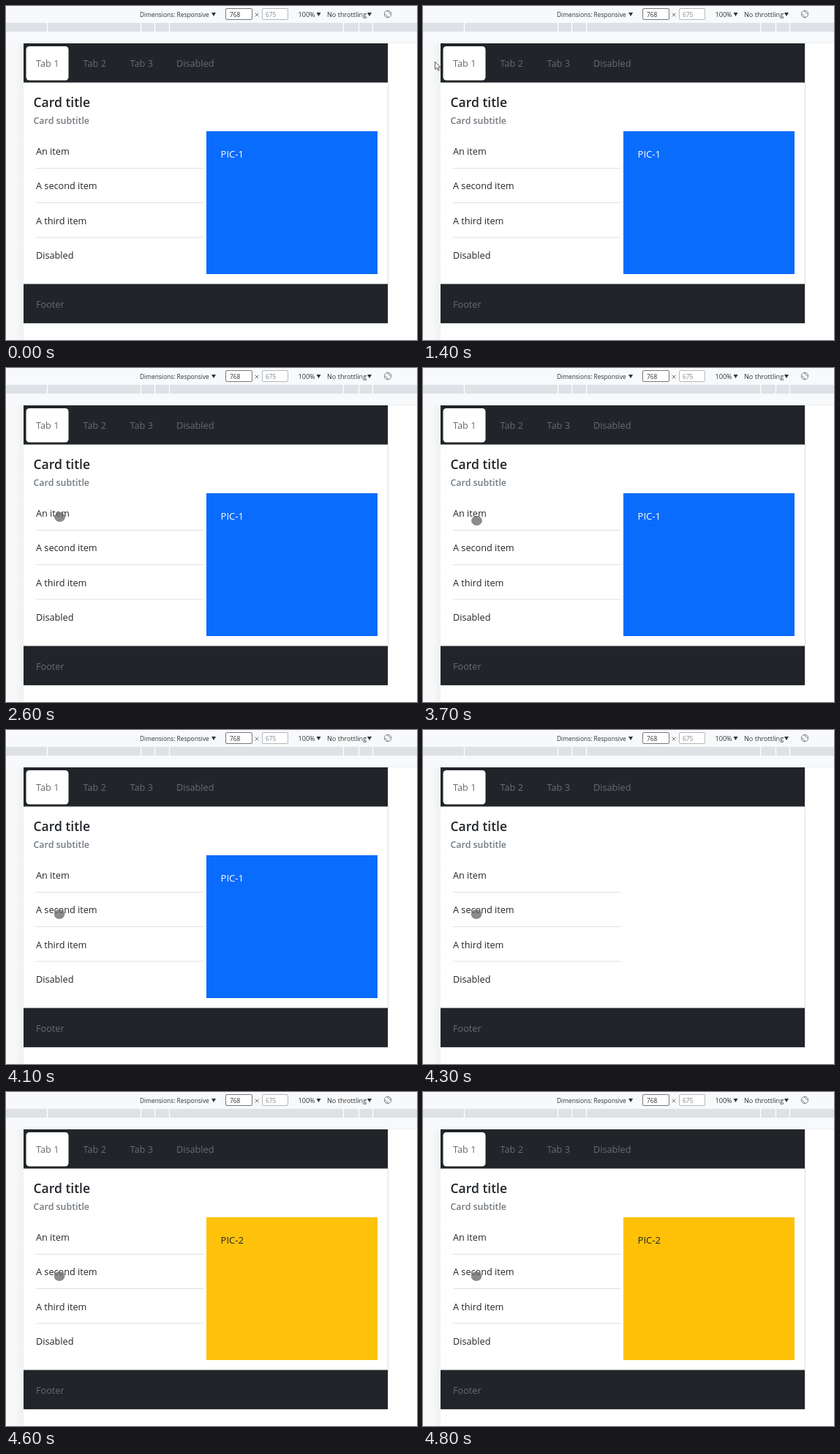
Recreate the animation shown at these times as an HTML page. Size 562 by 456 pixels, loop 5 s.

```html
<!DOCTYPE html>
<html lang="en">
<head>
<meta charset="utf-8">
<title>Tabbed card</title>
<style>
  html, body { margin: 0; width: 100%; height: 100%; overflow: hidden; background: #fff; }
  svg { display: block; width: 562px; height: 456px; }
  text { font: 12.7px "Open Sans", "Noto Sans", sans-serif; fill: #212529; }
  .bar text { font-size: 8.4px; fill: #303336; }
  .bar .wide { font-size: 9.1px; }
  .bar .dim { fill: #80868b; }
  .muted text { fill: #686c70; }
  .title { font-size: 17.5px; font-weight: 600; }
  .sub { font-size: 12.4px; font-weight: 600; fill: #747b82; }
  .pic text { font-size: 13.1px; }
</style>
</head>
<body>
<svg viewBox="0 0 562 456" xmlns="http://www.w3.org/2000/svg">
  <defs>
    <linearGradient id="edge">
      <stop offset="0" stop-color="#f8f9f9"/>
      <stop offset=".6" stop-color="#f6f8f8"/>
      <stop offset="1" stop-color="#eef0f1"/>
    </linearGradient>
  </defs>

  <rect width="562" height="456" fill="#f8f9fa"/>
  <rect y="51" width="24" height="405" fill="url(#edge)"/>
  <rect y="23" width="562" height="12" fill="#dee1e6"/>
  <path d="M56.5 23v12M184.5 23v12M203.5 23v12M223.5 23v12M461.5 23v12M482.5 23v12M501.5 23v12" stroke="#fff" stroke-width="1.3"/>

  <g class="bar">
    <text x="183" y="15">Dimensions: Responsive</text>
    <g fill="#fff" stroke="#b4b8bc">
      <rect x="300.5" y="3.5" width="36" height="15" rx="1.5" stroke="#777b7f"/>
      <rect x="350.5" y="3.5" width="35" height="15" rx="1.5"/>
    </g>
    <text x="306" y="15">768</text>
    <path d="M340.6 9.6l4.8 4.8m0-4.8l-4.8 4.8" stroke="#66696d" stroke-width=".9"/>
    <text class="dim" x="355" y="15">675</text>
    <text class="wide" x="399.500" y="15">100%</text>
    <text class="wide" x="439" y="15">No throttling</text>
    <path d="M281 9h6l-3 5zM424.500 9h6l-3 5zM494 9h6l-3 5z" fill="#303336"/>
    <g fill="none" stroke="#6b6f73" stroke-width=".9">
      <rect x="519.500" y="6.500" width="5" height="9" rx="1" transform="rotate(-45 522 11)"/>
      <path d="M521 6.200a5 5 0 0 1 5.800 5M523 15.800a5 5 0 0 1-5.800-5"/>
    </g>
  </g>

  <rect x="24" y="51" width="538" height="405" fill="#fff"/>
  <path d="M522 50.500h40" stroke="#eceef0"/>
  <path d="M522.500 51v382M24 433.500h498" stroke="#dcdedf"/>
  <path d="M24 51h498v53.500H24zM24 379.500h498V433H24z" fill="#212529"/>
  <rect x="27.500" y="55" width="58" height="46.500" rx="4.500" fill="#fff"/>
  <g class="muted">
    <text x="41" y="83">Tab 1</text>
    <text x="105.500" y="83">Tab 2</text>
    <text x="169.500" y="83">Tab 3</text>
    <text x="233" y="83">Disabled</text>
    <text x="41" y="411.500">Footer</text>
  </g>
  <text class="title" x="37.500" y="138">Card title</text>
  <text class="sub" x="37.500" y="161">Card subtitle</text>
  <path d="M41 221.500h229M41 268.500h229M41 316h229" stroke="#dfdfdf"/>
  <text x="41" y="202.500">An item</text>
  <text x="41" y="250">A second item</text>
  <text x="41" y="297.500">A third item</text>
  <text x="41" y="345">Disabled</text>

  <g class="pic" id="pic1">
    <rect x="274" y="171" width="234" height="195" fill="#0a6cfd"/>
    <text x="293.500" y="207" style="fill:#fff">PIC-1</text>
  </g>
  <g class="pic" id="pic2" opacity="0">
    <rect x="274" y="171" width="234" height="195" fill="#ffc107"/>
    <text x="293.500" y="207">PIC-2</text>
  </g>

  <path id="arrow" visibility="hidden" d="M16.500 76v10.500l2.400-2.100 1.700 3.700 1.600-.7-1.700-3.600h3.200z" fill="#fff" stroke="#333" stroke-width=".8"/>
  <ellipse id="touch" visibility="hidden" rx="7" ry="6.200" fill="#666" fill-opacity=".76" stroke="#777" stroke-opacity=".7" stroke-width=".8"/>
</svg>

<script>
const LOOP = 5000, STEP = 100;
const $ = id => document.getElementById(id);
const [pic1, pic2, arrow, touch] = ["pic1", "pic2", "arrow", "touch"].map($);

// time, x, y of the touch point
const path = [
  [1500, 38, 76], [1700, 60, 88], [1900, 69, 112],
  [2500, 73.5, 203.5], [3600, 73.5, 203.5], [4100, 73, 251.5]
];
const ease = u => u * u * (3 - 2 * u);

function touchAt(t) {
  const i = path.findIndex(p => p[0] > t);
  if (i < 0) return path[path.length - 1].slice(1);
  const [t0, x0, y0] = path[i - 1], [t1, x1, y1] = path[i];
  const lin = (t - t0) / (t1 - t0);
  const u = t0 < 1900 ? lin : ease(lin);
  return [x0 + (x1 - x0) * u, y0 + (y1 - y0) * u];
}

function show(el, on) {
  el.setAttribute("visibility", on ? "visible" : "hidden");
}

function fadeIn(t) {
  return t < 4500 ? 0 : Math.min(1, 0.58 + (t - 4500) / 250);
}

function draw(t) {
  show(pic1, t < 4300);
  pic2.setAttribute("opacity", fadeIn(t));
  show(arrow, t >= 1400 && t < 1500);
  show(touch, t >= 1500);
  if (t >= 1500) {
    const [x, y] = touchAt(t);
    touch.setAttribute("cx", x);
    touch.setAttribute("cy", y);
  }
}

const start = performance.now();
function frame() {
  const t = (performance.now() - start) % LOOP;
  draw(Math.floor(t / STEP) * STEP);
  requestAnimationFrame(frame);
}
frame();
</script>
</body>
</html>
```
